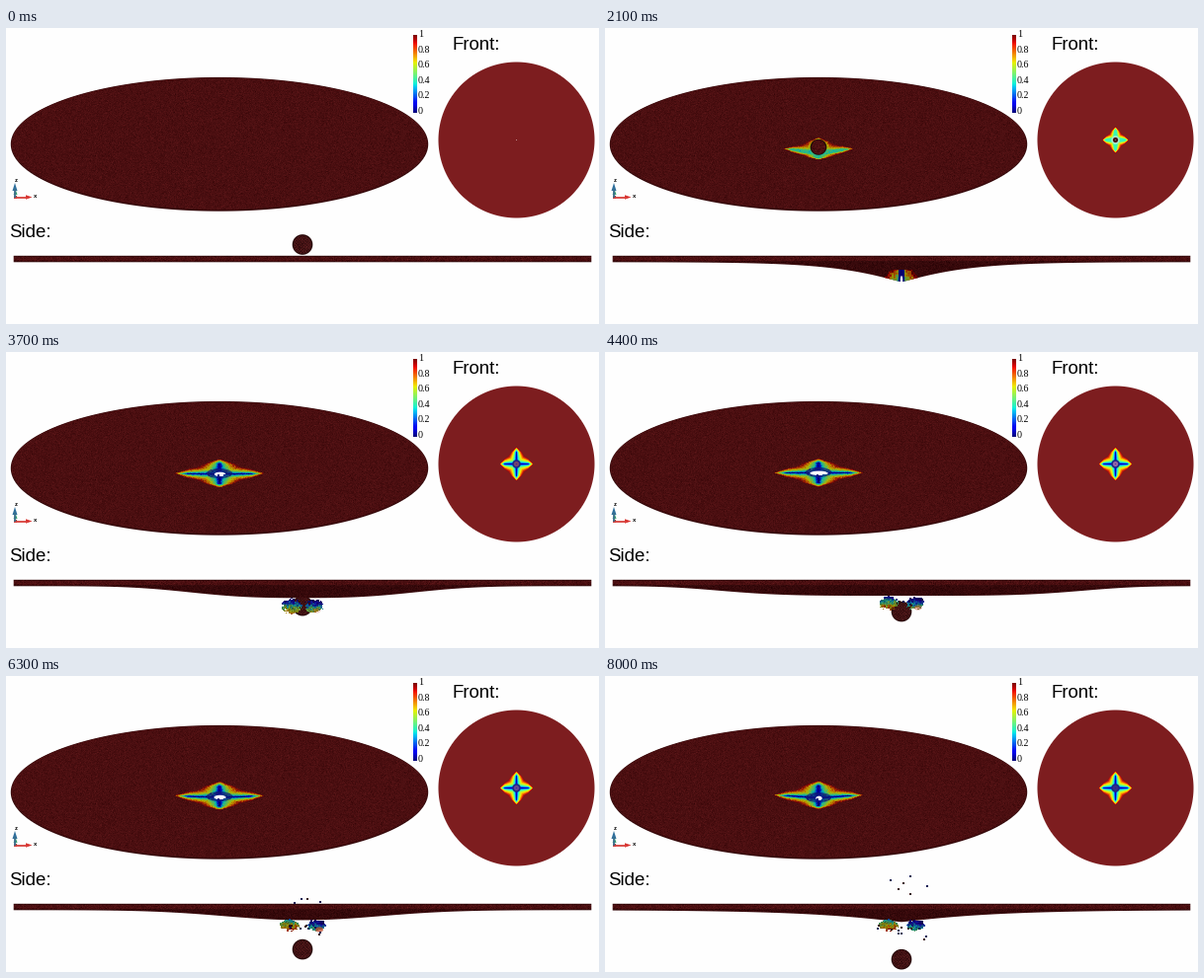
Write a matplotlib script that moves like this. It is 600 px wide and 300 px high and loops after 8100 ms.

```python
import numpy as np
import matplotlib.pyplot as plt
from matplotlib.animation import FuncAnimation

W, H, DPI = 600, 300, 100
FRAMES, STEP = 81, 100
R = 292                                   # plate radius in side-view pixels
TILT = dict(cx=216, cy=117.6, rx=210.5, ry=67)
FRONT = dict(cx=516.5, cy=113.5, rx=79, ry=79)
BREAK = 2.1                               # the plate gives way, in seconds
DROP = 0.5                                # tilted-view shift per side-view pixel

DARK, RED = np.array([75, 15, 17]), np.array([125, 29, 31])
SHADOW, BLUE = np.array([54, 9, 11]), np.array([14, 24, 120])
LILAC, WHITE = np.array([150, 100, 165]), np.array([254, 254, 254])

rng = np.random.default_rng(4)
PY, PX = np.mgrid[0:H, 0:W] + 0.5
GRAIN = rng.normal(0, 1, (H, W))
LUMPS = np.kron(rng.uniform(-1, 1, (H // 2, W // 2)), np.ones((2, 2)))
JET = plt.get_cmap("jet")


def ramp(t, start, end):
    return np.clip((t - start) / (end - start), 0, 1)


def pulse(t, peak, width):
    return np.exp(-((t - peak) / width) ** 2)


def jet(value):
    return JET(np.clip(value, 0, 1))[..., :3] * 255


def blend(img, color, alpha):
    a = np.asarray(alpha)[..., None]
    img[:] = img * (1 - a) + color * a


def oval(cx, cy, rx, ry, x=PX, y=PY):
    """Antialiased coverage of an ellipse."""
    q = np.hypot((x - cx) / rx, (y - cy) / ry)
    g = np.hypot((x - cx) / rx**2, (y - cy) / ry**2) + 1e-9
    return np.clip(0.5 - (q - 1) * q / g, 0, 1)


def speckled(color, amount):
    return np.clip(color + amount * GRAIN[..., None] * [1, 0.45, 0.45], 0, 255)


def ball_height(t):
    return 219.5 + 11.66 * t - 0.4 * t**2


def sag_depth(t):
    if t < BREAK:
        return 20 * t / BREAK
    return 9 + 11 * pulse(t, BREAK, 1.4) + 3 * ramp(t, 5.3, 8)


def sag(d, t):
    """Downward bend of the plate at distance d; a wide swell follows the break."""
    swell = pulse(t, 4.8, 1.3)
    width = 15 + 43 * ramp(t, 0, BREAK) + 152 * swell + 30 * ramp(t, 5.3, 8)
    return sag_depth(t) * np.exp(-(d / width) ** (1.1 + 3.6 * swell))


def health(x, y, t):
    """Material state around the cross-shaped crack: 0 broken, 1 intact."""
    size = 0.02 + 0.76 * ramp(t, 0.4, BREAK) + 0.22 * ramp(t, BREAK, 3)
    x, y = np.abs(x) / size, np.abs(y) / size
    minor, major = np.minimum(x, y), np.maximum(x, y)
    off_crack = np.maximum(minor - 1.5, 0) + 0.4 * np.maximum(major - 44, 0)
    reach = np.maximum(0.7 * (74 - major), 2)
    lowest = 1 - 0.58 * ramp(t, 0.4, BREAK) - 0.36 * ramp(t, BREAK, 2.8)
    return np.clip(np.sqrt(off_crack / reach), lowest, 1)


def paint_health(area, phi, shade):
    intact = ramp(phi, 0.78, 1)[..., None]
    area[:] = jet(phi) * shade * (1 - intact) + area * intact


def window(x0, x1, y0, y1):
    return np.s_[y0:y1, x0:x1]


def backdrop():
    img = np.full((H, W, 3), 254.0)
    blend(img, SHADOW, oval(TILT["cx"], TILT["cy"] + 0.2, 211.2, 67.9))
    blend(img, speckled(DARK, 6), oval(TILT["cx"], TILT["cy"] - 0.3, 210.4, 66.8))
    blend(img, RED, oval(**FRONT))
    bar = window(412, 416, 7, 86)
    img[bar] = jet((86 - PY[bar]) / 79) * 0.95
    return img


BACKDROP = backdrop()


def draw_tilted(img, t):
    box = window(130, 302, 88, 152)
    x, y = PX[box], PY[box]
    wx = (x - TILT["cx"]) / TILT["rx"] * R
    low, high = np.full(x.shape, -R * 1.0), np.full(x.shape, R * 1.0)
    for _ in range(20):                   # invert the sagging projection
        mid = (low + high) / 2
        below = TILT["cy"] + TILT["ry"] / R * mid + DROP * sag(np.hypot(wx, mid), t) < y
        low, high = np.where(below, mid, low), np.where(below, high, mid)
    area = img[box]
    phi = health(wx, mid, t)
    paint_health(area, np.where(phi < 1, phi + 0.03 * GRAIN[box], 1), 0.72)

    centre = TILT["cy"] + DROP * sag_depth(t)
    torn = ramp(t, 2.3, 3)
    if torn:
        edge = oval(216, centre - 0.5, 13 * torn, 5 * torn, x, y)
        blend(area, BLUE, edge * (0.8 + 0.2 * LUMPS[box]))
    ball_h = 8 * (1 - ramp(t, 2.2, 4))
    if ball_h > 1.5:
        seen = ramp(t, 0.3, 1.5)
        ball_y = 107.5 + 6.3 * t
        blend(area, SHADOW * 0.6, seen * oval(216, ball_y, 8.3, ball_h, x, y))
        blend(area, speckled(DARK, 9)[box], seen * oval(216, ball_y, 7, ball_h - 0.8, x, y))
    hole = 9 * ramp(t, 3.2, 4) * (1 - 0.65 * ramp(t, 4.4, 8))
    if hole > 0.5:
        gap = oval(216.5, centre + 0.3, hole, 2.2, x, y)
        blend(area, WHITE, gap * (LUMPS[box] > -0.6))


def draw_front(img, t):
    box = window(484, 550, 81, 147)
    cx, cy, r = FRONT["cx"], FRONT["cy"], FRONT["rx"]
    x, y = PX[box], PY[box]
    area = img[box]

    def disc(radius):
        return oval(cx, cy, radius, radius, x, y)

    paint_health(area, health((x - cx) / r * R, (y - cy) / r * R, t), 0.97)
    blend(area, np.array([190, 235, 215]), 0.8 * pulse(t, BREAK, 0.4) * disc(4.3))
    blend(area, BLUE + 15, ramp(t, 2.3, 3) * disc(4.3))
    core = DARK + (LILAC - DARK) * ramp(t, 2.6, 4.4)
    core = core + (BLUE - core) * 0.7 * ramp(t, 4.4, 8)
    blend(area, core, ramp(t, 0.5, 1.5) * disc(2.6))


def draw_lobe(img, t, side):
    """Torn flap left (-1) or right (1) of the hole."""
    late, grow = ramp(t, 3, 5.3), ramp(t, 2.2, 3)
    cx = 300 + side * (9 + 4 * ramp(t, 3, 4.4)) + late * (side + 1) / 2
    cy = 252.5 + 6.5 * pulse(t, 3.1, 1.2)
    u, v = (PX - cx) / (1 + 7.5 * grow), (PY - cy) / (1 + 6 * grow - 1.8 * late)
    mask = np.hypot(u, v) + 0.22 * LUMPS < 1.05
    phi = 0.32 + (0.12 - side * 0.2) * late + (0.4 - 0.15 * late) * v + 0.12 * LUMPS
    color = jet(np.clip(phi, 0.04, 0.92)) * (0.62 + 0.08 * GRAIN[..., None])
    img[mask] = color[mask] * 0.85 + DARK * 0.2
    if side > 0:
        tip = oval(cx + 3, cy + 4.5, 4, 2.6)
        blend(img, np.array([190, 75, 45]), 0.75 * late * (1 - ramp(t, 6.3, 7.6)) * tip)


def draw_bits(img, t):
    chance = np.random.default_rng(11)
    for i in range(18):
        rises = i % 3 == 0
        born = chance.uniform(5, 7) if rises else chance.uniform(2.8, 6)
        x0, vx = 300 + chance.normal(0, 9), chance.normal(0, 4)
        vy = -chance.uniform(9, 15) if rises else chance.uniform(0, 5)
        age = t - born
        if age > 0:
            x = int(x0 + vx * age)
            y = int((238 if rises else 252) + vy * age)
            img[y:y + 2, x:x + 2] = SHADOW if i % 2 else BLUE * 0.7


def draw_side(img, t):
    ball_y = ball_height(t)
    grid = 0.8 + 0.2 * np.sin(PX * 2.1) * np.sin((PY - ball_y) * 2.1)
    blend(img, SHADOW * 0.7, oval(300, ball_y, 10.3, 10.3))
    blend(img, speckled(DARK + 8, 10) * grid[..., None], oval(300, ball_y, 9.2, 9.2))

    bottom = 237.3 + sag(np.abs(PX - 300), t)
    inside = (np.clip(PX - 7.2, 0, 1) * np.clip(592.8 - PX, 0, 1)
              * np.clip(PY - 230.3, 0, 1) * np.clip(bottom - PY + 0.5, 0, 1))
    rim = (PY < 237)[..., None]
    plate = np.where(rim, speckled(DARK, 8), speckled(SHADOW, 6))
    plate[(np.abs(PY - 231) < 0.6) | (np.abs(PY - 236.5) < 0.6)] *= 0.75
    blend(img, plate, inside)

    strain = ramp(t, 1, BREAK) * (1 - ramp(t, 3, 3.5))
    if strain:
        spread = np.abs(PX - 300) / 17 + np.abs(bottom - PY) / 26
        phi = 0.25 + 0.75 * spread / strain + 0.12 * LUMPS
        phi = np.where(np.abs(PX - 300) < 2.6, 0.06, phi)
        hot = inside * (spread < strain) * (PY > 245)
        blend(img, jet(phi) * 0.65, 0.9 * hot)
        notch = oval(300, bottom.max() - 2, 1.2, 4)
        blend(img, WHITE, notch * pulse(t, BREAK, 0.3))

    if t >= 2.2:
        for side in (-1, 1):
            draw_lobe(img, t, side)
    draw_bits(img, t)


def render(t):
    img = BACKDROP.copy()
    for draw in (draw_tilted, draw_front, draw_side):
        draw(img, t)
    return np.clip(img, 0, 255).astype(np.uint8)


fig = plt.figure(figsize=(W / DPI, H / DPI), dpi=DPI)
ax = fig.add_axes([0, 0, 1, 1])
ax.axis("off")
picture = ax.imshow(render(0), extent=(0, W, H, 0), interpolation="nearest", aspect="auto")
ax.set(xlim=(0, W), ylim=(H, 0))


def label(x, y, text, px, family="Liberation Sans", **style):
    ax.text(x, y, text, fontsize=px * 72 / DPI, family=family, **style)


label(451.8, 21.5, "Front:", 18.6)
label(3, 212, "Side:", 18.6)
for i in range(6):
    label(417, 5.5 + 15.6 * i, f"{1 - i / 5:.1g}", 10, "Liberation Serif", va="center_baseline")

# orientation axes
ax.plot([9, 21], [171.5, 171.5], color="#d8403c", lw=1.3)
ax.fill([20, 26.5, 20], [169.3, 171.5, 173.7], color="#d8302c", lw=0)
ax.plot([9, 9], [171, 164], color="#3c6f8c", lw=1.3)
ax.fill([6.5, 9, 11.5], [165, 157, 165], color="#2f6f9c", lw=0)
ax.fill([7.5, 10, 11.5], [169, 164.5, 169], color="#35a070", lw=0)
ax.fill([7.5, 10.5, 10.5, 7.5], [170, 170, 173, 173], color="#8a4a48", lw=0)
label(27.5, 172.5, "x", 6, weight="bold")
label(9, 156.5, "z", 6, weight="bold")


def update(frame):
    picture.set_data(render(frame * STEP / 1000))
    return [picture]


anim = FuncAnimation(fig, update, frames=FRAMES, interval=STEP, repeat=True, repeat_delay=0)
plt.show()
```
